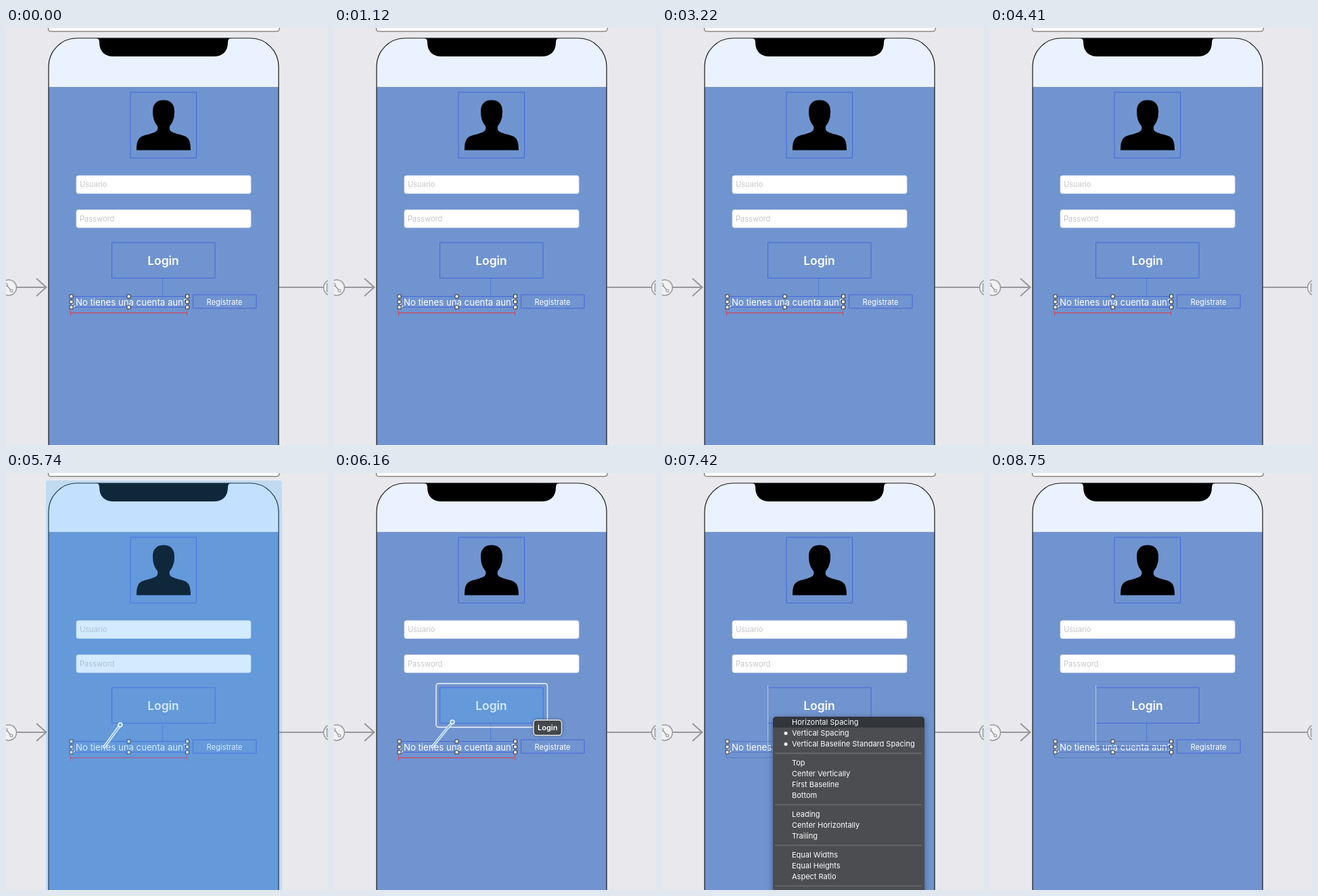
Animation, 476 px wide and 616 px high, one loop 8820 ms. Source, as an HTML page with a canvas:

```html
<!DOCTYPE html>
<html lang="es">
<head>
<meta charset="utf-8">
<title>Login layout</title>
<style>
html, body { margin: 0; width: 100%; height: 100%; overflow: hidden; background: #e9e9ed; }
canvas { display: block; }
</style>
</head>
<body>
<canvas id="stage" width="476" height="616"></canvas>
<script>
const c = document.getElementById('stage').getContext('2d');
const LOOP = 8820;
const VIEW_ON = 5300, LOGIN_ON = 5880, MENU_ON = 6580, MENU_OFF = 7420;
const BLUE = '#4666dc', TINT = 'rgba(60,170,255,';
const menuRows = [
  ['Horizontal Spacing', 368], ['Vertical Spacing', 384], ['Vertical Baseline Standard Spacing', 400],
  ['Top', 428], ['Center Vertically', 444], ['First Baseline', 460], ['Bottom', 476],
  ['Leading', 504], ['Center Horizontally', 520], ['Trailing', 536],
  ['Equal Widths', 564], ['Equal Heights', 580], ['Aspect Ratio', 596]
];

const clamp = v => Math.max(0, Math.min(1, v));
const ramp = (t, from, span) => clamp((t - from) / span);
const smooth = v => v * v * (3 - 2 * v);

function text(s, x, y, size, color, weight = 400, align = 'left') {
  c.font = `${weight} ${size}px Inter, "Liberation Sans", sans-serif`;
  c.textAlign = align;
  c.fillStyle = color;
  c.fillText(s, x, y);
}

function line(color, width, ...p) {
  c.strokeStyle = color;
  c.lineWidth = width;
  c.beginPath();
  for (let i = 0; i < p.length; i += 2) c.lineTo(p[i], p[i + 1]);
  c.stroke();
}

function box(x, y, w, h, r, fill, stroke, width = 1) {
  c.beginPath();
  c.roundRect(x, y, w, h, r);
  if (fill) { c.fillStyle = fill; c.fill(); }
  if (stroke) { c.strokeStyle = stroke; c.lineWidth = width; c.stroke(); }
}

function disc(x, y, r, fill, stroke, width) {
  c.beginPath();
  c.arc(x, y, r, 0, Math.PI * 2);
  c.fillStyle = fill;
  c.fill();
  c.strokeStyle = stroke;
  c.lineWidth = width;
  c.stroke();
}

function canvasChrome() {
  c.fillStyle = '#e9e9ed';
  c.fillRect(0, 0, 476, 616);
  box(62.5, -20, 341.5, 25, 3, '#fff', '#555');
  const gray = '#98989b';
  line(gray, 2, 16, 383, 60, 383);
  line(gray, 2, 45, 370, 59.5, 383, 45, 396);
  disc(4, 383.5, 11.5, '#f2f2f3', gray, 1.5);
  line(gray, 1.5, 1, 380, 7, 387);
  disc(0, 379, 2, '#f2f2f3', gray, 1.2);
  disc(8, 388, 2, '#f2f2f3', gray, 1.2);
  line(gray, 2, 404, 383, 470, 383);
  disc(481, 383.5, 11.5, '#f2f2f3', gray, 1.5);
  line(gray, 1.5, 476, 378, 474.5, 378, 474.5, 389, 476, 389);
}

function phone() {
  box(63, 15, 340, 660, 42, '#ebf2ff');
  c.fillStyle = '#7094cf';
  c.fillRect(63, 88, 340, 528);
  line('#8098bd', 1, 63, 87.5, 403, 87.5);
  c.fillStyle = '#000';
  c.beginPath();
  c.moveTo(133, 15);
  c.quadraticCurveTo(138, 15, 138, 21);
  c.bezierCurveTo(138, 35, 146, 42, 159, 42);
  c.lineTo(307, 42);
  c.bezierCurveTo(320, 42, 328, 35, 328, 21);
  c.quadraticCurveTo(328, 15, 333, 15);
  c.fill();
  box(63, 15, 340, 660, 42, null, '#15181e', 1.2);
}

function avatar() {
  c.fillStyle = '#000';
  c.beginPath();
  c.moveTo(193, 180.5);
  c.bezierCurveTo(193, 161, 199, 160, 211, 157);
  c.bezierCurveTo(220, 154, 226, 153, 224, 145);
  c.bezierCurveTo(218, 138, 217, 130, 217, 123);
  c.bezierCurveTo(217, 112, 223, 106.5, 233, 106.5);
  c.bezierCurveTo(243, 106.5, 249, 112, 249, 123);
  c.bezierCurveTo(249, 130, 248, 138, 242, 145);
  c.bezierCurveTo(240, 153, 246, 154, 255, 157);
  c.bezierCurveTo(267, 160, 273, 161, 273, 180.5);
  c.fill();
  box(184, 95, 97.5, 97, 0, null, BLUE);
}

function field(name, y) {
  box(104, y, 258, 26.5, 3, '#fff', '#dce3ee', .8);
  text(name, 109, y + 17, 11.1, '#c7c7cb');
}

function handles() {
  for (const x of [96.5, 181.5, 268])
    for (const y of [396.5, 404.5, 412.5])
      if (x !== 181.5 || y !== 404.5) box(x - 2.5, y - 2.5, 5, 5, 0, '#f4f4f4', '#333');
}

function content(linked) {
  avatar();
  field('Usuario', 218);
  field('Password', 268.5);
  box(156.5, 317, 152.5, 52.5, 0, null, BLUE);
  text('Login', 232.5, 349.5, 17.4, '#fff', 600, 'center');
  line('#527bd2', 1, 231.5, 370, 231.5, 396);
  box(276.5, 394, 93.5, 20, 0, null, BLUE);
  text('Registrate', 323, 408.5, 11.1, '#fff', 400, 'center');

  box(96.5, 396.5, 171.5, 16, 0, null, linked ? '#5878c8' : BLUE);
  c.save();
  c.beginPath();
  c.rect(97, 392, 172, 26);
  c.clip();
  text('No tienes una cuenta aun?', 103, 409.5, 13.2, '#fff');
  text('¿', 102.5, 409.5, 13.2, '#fff', 400, 'right');
  c.restore();

  if (linked) {
    line('#7094cf', 2, 156.5, 318, 156.5, 369);
    line('#b4c8ea', 1, 156.5, 313, 156.5, 411);
    line('#3f62b8', 1, 157, 405, 268, 405);
    line('#597cc4', 1, 95.5, 416, 95.5, 420.5, 267.5, 420.5, 267.5, 416);
  } else {
    const red = '#cf4560';
    line(red, 1.3, 95.5, 420.7, 267.5, 420.7);
    line(red, 1, 95.5, 417, 95.5, 425);
    line(red, 1, 267.5, 417, 267.5, 425);
  }
  handles();
}

function viewGlow(a) {
  box(59, 11, 349, 640, 3, TINT + .23 * a + ')');
}

function loginGlow(a) {
  c.save();
  c.globalAlpha = a;
  box(156.5, 317, 152.5, 52.5, 0, TINT + '.23)');
  box(151, 311, 164.5, 64.5, 3.5, null, '#f4f6f8', 1.4);
  c.shadowColor = 'rgba(0,0,0,.35)';
  c.shadowBlur = 4;
  box(295, 365, 41.5, 22.5, 4.5, '#46494c', '#e8ebee', 1.4);
  c.shadowBlur = 0;
  text('Login', 315.7, 380.3, 11, '#fff', 600, 'center');
  c.restore();
}

function dragLine(t) {
  const a = smooth(ramp(t, 5040, 660));
  const b = smooth(ramp(t, 5740, 380));
  const x = 147 + 22 * a + 6 * b, y = 403 - 31 * a - 4 * b;
  c.lineCap = 'round';
  line('#eef6fb', 4, 145, 405, x, y);
  line('#78b2dc', 1.5, 145, 405, x, y);
  c.lineCap = 'butt';
  disc(x, y, 3, '#78b8e2', '#eef6fb', 1.4);
}

function menu(a) {
  c.save();
  c.globalAlpha = a;
  c.shadowColor = 'rgba(0,0,0,.4)';
  c.shadowBlur = 8;
  c.shadowOffsetY = 2;
  box(164, 360, 224, 300, 5, '#4d4e51');
  c.shadowColor = 'transparent';
  box(164, 360, 224, 16, [5, 5, 0, 0], '#33363a');
  for (const y of [414, 490, 550, 610]) line('#6c6d70', 1.3, 167, y, 384, y);
  for (const [s, y] of menuRows) text(s, 192, y + 4, 11, '#fff');
  for (const y of [384.5, 400.5]) {
    c.beginPath();
    c.arc(183, y, 2.5, 0, 7);
    c.fill();
  }
  c.restore();
}

function draw(t) {
  canvasChrome();
  phone();
  content(t >= MENU_ON);
  const view = ramp(t, VIEW_ON, 200) * (1 - ramp(t, LOGIN_ON, 150));
  if (view) viewGlow(view);
  const login = ramp(t, LOGIN_ON, 150);
  if (login && t < MENU_ON) loginGlow(login);
  if (t >= 5040 && t < MENU_ON) dragLine(t);
  const shown = 1 - ramp(t, MENU_OFF, 180);
  if (t >= MENU_ON && shown) menu(shown);
}

function tick() {
  draw(performance.now() % LOOP);
  requestAnimationFrame(tick);
}
tick();
</script>
</body>
</html>
```
